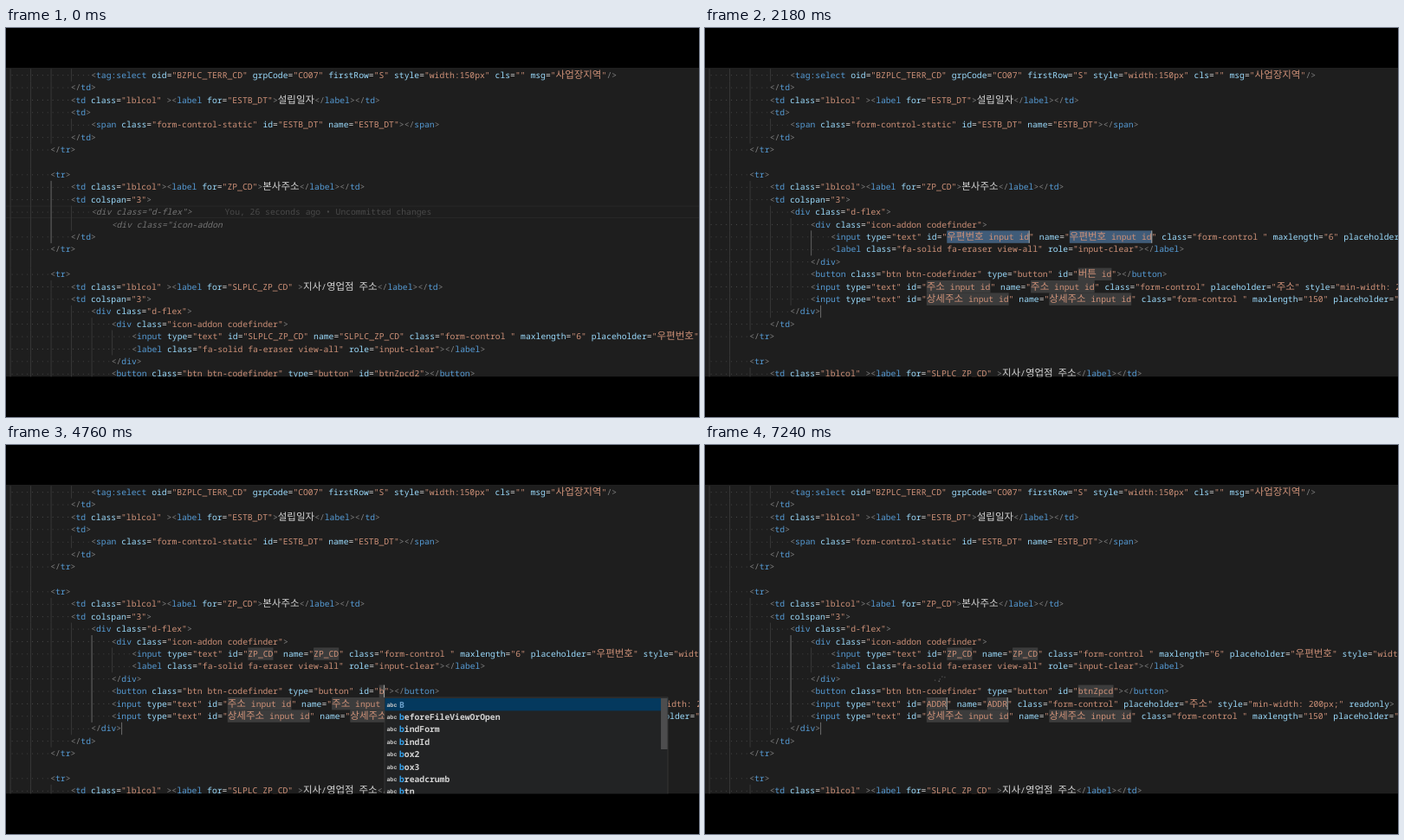
Animation, 800 px wide and 450 px high, one loop 7.27 s. Source, as an HTML page:

```html
<!DOCTYPE html>
<html lang="ko">
<head>
<meta charset="utf-8">
<style>
  html, body { margin: 0; width: 100%; height: 100%; overflow: hidden; background: #000; }
  svg { display: block; width: 800px; height: 450px; }
  text {
    font: 500 9.717px "Noto Sans Mono", "DejaVu Sans Mono", monospace;
    white-space: pre;
    text-rendering: geometricPrecision;
  }
  text.ko { font: 11.5px "Noto Sans CJK KR", "Noto Sans CJK", sans-serif; }
  text.ghost { font-style: italic; }
  text.item { font-weight: 600; }
  text.abc { font: bold 6.6px Inter, Roboto, sans-serif; }
</style>
</head>
<body>
<svg viewBox="0 0 800 450">
  <rect y="46" width="800" height="357.5" fill="#1e1e1e"/>
  <g id="editor"></g>
  <g id="sparks"></g>
  <path d="M0 0H800V46H0ZM0 403.5H800V450H0Z"/>
</svg>
<script>
const LOOP = 7270;
const LEFT = 4.2, TAB = 23.5, CHAR = 5.83, HANGUL = 10.6;
const TOP = 47.2, ROW = 14.4, BASE = 10.6;
const NOTE_SCALE = 0.857;

// Each field: when it gets the focus, what is typed there and when.
const FIELDS = [
  { from: 0, word: 'v-post', keys: [30, 600, 850, 1060, 1260, 1450], minPopup: 2,
    items: ['v-post', 'v-postcode'], details: ['Emmet Abbreviation', '우편번호 input 레이아웃'],
    guide: [3, 11, 11] },
  { from: 1900, word: 'ZP_CD', keys: [2880, 2980, 3090, 3220, 3500], hint: '우편번호 input id',
    items: ['ZP_CD', 'SLPLC_ZP_CD'], row: 13, guide: [5, 13, 14] },
  { from: 3900, word: 'btnZpcd', keys: [4400, 4900, 5080, 5260, 5440, 5600, 5760], hint: '버튼 id',
    items: ['B', 'beforeFileViewOrOpen', 'bindForm', 'bindId', 'box2', 'box3', 'breadcrumb', 'btn', 'btnZpcd2'],
    row: 16, guide: [4, 12, 18] },
  { from: 6000, word: 'ADDR', keys: [6500, 6660, 6820, 6980], hint: '주소 input id',
    items: ['ADDR', 'SLPLC_ADDR'], row: 17, guide: [4, 12, 18] }
];
const GHOST_GUIDE = [2, 9, 13];

// Lines are [indent level, text]; braces mark snippet fields.
const HEAD = [
  [4, '<tag:select oid="BZPLC_TERR_CD" grpCode="CO07" firstRow="S" style="width:150px" cls="" msg="사업장지역"/>'],
  [3, '</td>'],
  [3, '<td class="lblcol" ><label for="ESTB_DT">설립일자</label></td>'],
  [3, '<td>'],
  [4, '<span class="form-control-static" id="ESTB_DT" name="ESTB_DT"></span>'],
  [3, '</td>'],
  [2, '</tr>'],
  [2, ''],
  [2, '<tr>'],
  [3, '<td class="lblcol"><label for="ZP_CD">본사주소</label></td>'],
  [3, '<td colspan="3">']
];
const TAIL = [
  [3, '</td>'],
  [2, '</tr>'],
  [2, ''],
  [2, '<tr>'],
  [3, '<td class="lblcol" ><label for="SLPLC_ZP_CD" >지사/영업점 주소</label></td>'],
  [3, '<td colspan="3">'],
  ...addressBlock('SLPLC_ZP_CD', 'btnZpcd2', 'SLPLC_ADDR', '주소 (법정동명을 입력 안 하는 경우)')
];

function addressBlock(zip, button, addr, hint) {
  return [
    [4, '<div class="d-flex">'],
    [5, '<div class="icon-addon codefinder">'],
    [6, `<input type="text" id="${zip}" name="${zip}" class="form-control " maxlength="6" placeholder="우편번호" style="width: 100px;">`],
    [6, '<label class="fa-solid fa-eraser view-all" role="input-clear"></label>'],
    [5, '</div>'],
    [5, `<button class="btn btn-codefinder" type="button" id="${button}"></button>`],
    [5, `<input type="text" id="${addr}" name="${addr}" class="form-control" placeholder="${hint}" style="min-width: 200px;" readonly>`]
  ];
}

function snippet(values) {
  const [zip, button, addr] = values.map(v => `{${v}}`);
  const detail = '{상세주소 input id}';
  return [
    ...addressBlock(zip, button, addr, '주소'),
    [5, `<input type="text" id="${detail}" name="${detail}" class="form-control " maxlength="150" placeholder="상세주소">`],
    [4, '</div>{}']
  ];
}

const isHangul = c => c >= '가' && c <= '힣';
const width = s => [...s].reduce((w, c) => w + (isHangul(c) ? HANGUL : CHAR), 0);
const rowTop = row => TOP + row * ROW;
const levelX = level => LEFT + level * TAB;
const escape = s => s.replace(/&/g, '&amp;').replace(/</g, '&lt;');
const rect = (x, y, w, h, fill, more = '') =>
  `<rect x="${x}" y="${y}" width="${w}" height="${h}" fill="${fill}" ${more}/>`;

function label(x, y, str, fill, cls = '') {
  let out = '';
  for (const part of str.match(/[가-힣]+|[^가-힣]+/g) || []) {
    const kind = isHangul(part[0]) ? 'ko' : cls;
    out += `<text class="${kind}" x="${x.toFixed(2)}" y="${y.toFixed(2)}" fill="${fill}">${escape(part)}</text>`;
    x += width(part);
  }
  return out;
}

const TOKEN = /(<\/?|\/?>)|((?<=<\/?)[\w:]+)|("[^"]*"?)|([\w-]+(?=[=>]))|[^<>"\w]+|\w+/g;
const COLORS = ['#808080', '#569cd6', '#ce9178', '#9cdcfe'];

function code(x, y, str) {
  let out = '';
  for (const m of str.matchAll(TOKEN)) {
    const group = [1, 2, 3, 4].find(i => m[i] !== undefined);
    out += label(x, y, m[0], group ? COLORS[group - 1] : '#d4d4d4');
    x += width(m[0]);
  }
  return out;
}

const caret = (x, y) => rect(x - 0.4, y, 1, ROW, '#aeafad');
const guide = (level, row, rows, fill) => rect(levelX(level) + 0.4, rowTop(row), 1, rows * ROW + 0.1, fill);

function indent(level, row, dots) {
  let out = '';
  for (let k = 0; k < level; k++) out += guide(k, row, 1, '#383838');
  if (dots) {
    out += `<path d="M${LEFT + 2.9} ${rowTop(row) + 7.4}H${levelX(level) - 1}" stroke="#484848" ` +
      `stroke-width="1.1" stroke-linecap="round" stroke-dasharray="0 ${TAB / 4}"/>`;
  }
  return out;
}

// Draws one line; returns markup and the x of every field end.
function drawLine(row, [level, src], focus, selected) {
  const y = rowTop(row), x0 = levelX(level), ends = [];
  let boxes = '', carets = '', before = '';
  for (const m of src.matchAll(/([^{]*)\{([^}]*)\}/g)) {
    before += m[1];
    const x = x0 + width(before), w = width(m[2]);
    before += m[2];
    boxes += m[2]
      ? rect(x, y, w, ROW, focus && selected ? '#405c79' : '#3c3c3c')
      : rect(x, y, 0.9, ROW, '#747474');
    ends.push(x + w);
    if (focus) carets += caret(x + w, y);
  }
  const text = code(x0, y + BASE, src.replace(/[{}]/g, ''));
  return { svg: indent(level, row, src) + boxes + text + carets, ends };
}

function icon(kind, x, y) {
  if (kind === 'word') return label(x, y + 9.6, 'abc', '#c8c8c8', 'abc');
  if (kind === 'wrench') {
    return `<path d="M${x + 2} ${y + 11}L${x + 6.4} ${y + 6.6}M${x + 8.6} ${y + 2.6}l-2 2l1.6 1.6l2-2a3 3 0 1 1-1.6-1.6" ` +
      'fill="none" stroke="#d4d4d4" stroke-width="1.5" stroke-linecap="round"/>';
  }
  return rect(x + 1.8, y + 2.8, 8.4, 8.8, 'none', 'stroke="#c8c8c8" stroke-width="1.1"');
}

// Smaller text that ends at the given x.
function note(right, y, str, fill, cls) {
  const x = right - width(str) * NOTE_SCALE;
  return `<g transform="translate(${x} ${y}) scale(${NOTE_SCALE})">${label(0, 0, str, fill, cls)}</g>`;
}

function popup(x, y, field, typed) {
  const find = s => s.toLowerCase().indexOf(typed.toLowerCase());
  const list = field.items.filter(s => find(s) >= 0);
  const w = 327;
  let out = rect(x, y, w, list.length * ROW + 2, '#222324', 'stroke="#3c3c3c" stroke-width=".8"');
  list.forEach((item, i) => {
    const top = y + 1 + i * ROW, base = top + BASE, at = find(item);
    if (!i) out += rect(x + 0.5, top, w - 1, ROW, '#04395e');
    const kind = !field.details ? 'word' : i ? 'snippet' : 'wrench';
    out += icon(kind, x + 2.5, top);
    let tx = x + 17;
    [item.slice(0, at), item.slice(at, at + typed.length), item.slice(at + typed.length)].forEach((part, k) => {
      out += label(tx, base, part, k === 1 ? (i ? '#36a3ee' : '#6a9fca') : '#d4d4d4', 'item');
      tx += width(part);
    });
    if (field.details) out += note(x + w - 8, base - 0.4, field.details[i], i ? '#a8a8a8' : '#d4d4d4', i ? '' : 'item');
  });
  if (list.length > 7) out += rect(x + w - 8, y + 1, 7.6, 59, '#4d4d4e');
  return out;
}

function stateAt(t) {
  const focus = FIELDS.findLastIndex(f => t >= f.from);
  const count = FIELDS[focus].keys.filter(k => t >= k).length;
  return { focus, count };
}

function valueOf(i, focus, typed) {
  const f = FIELDS[i];
  return i < focus ? f.word : i === focus && typed ? typed : f.hint;
}

function drawEditor({ focus, count }) {
  const field = FIELDS[focus], typed = field.word.slice(0, count);
  const ghost = !focus && !count;
  let body, out = '', at = levelX(4) + width(typed), row = 11;
  if (focus) {
    body = snippet([1, 2, 3].map(i => valueOf(i, focus, typed)));
    row = field.row;
  } else {
    body = ghost ? [[4, ' '], [4, '']] : [[4, typed]];
  }
  if (ghost) out += rect(0, rowTop(11), 800, 0.9, '#292929') + rect(0, rowTop(12) - 0.9, 800, 0.9, '#292929');
  [...HEAD, ...body, ...TAIL].slice(0, 25).forEach((line, r) => {
    const focused = focus > 0 && r === row;
    const { svg, ends } = drawLine(r, line, focused, !count);
    out += svg;
    if (focused) at = ends[0];
  });
  const [level, first, last] = ghost ? GHOST_GUIDE : field.guide;
  out += guide(level, first, last - first + 1, '#5e5e5e');
  if (ghost) {
    out += label(levelX(4), rowTop(11) + BASE, '<div class="d-flex">', '#747474', 'ghost');
    out += label(levelX(5), rowTop(12) + BASE, '<div class="icon-addon', '#747474', 'ghost');
    out += label(252.5, rowTop(11) + BASE, 'You, 26 seconds ago • Uncommitted changes', '#494949');
  } else if (!focus) {
    out += caret(at, rowTop(11));
  }
  const done = focus && (count === field.word.length && field.word !== 'btnZpcd');
  if (count >= (field.minPopup || 1) && !done) out += popup(at + 0.5, rowTop(row + 1), field, typed);
  return { svg: out, x: at, y: rowTop(row) + ROW / 2 };
}

const random = n => { const v = Math.sin(n * 91.7) * 4373.3; return v - Math.floor(v); };

// Small specks rise from the caret after each key.
function drawSparks(t, { focus, count }, { x, y }) {
  const age = count ? t - FIELDS[focus].keys[count - 1] : LOOP;
  if (age > 330) return '';
  let out = '';
  for (let i = 0; i < 6; i++) {
    const seed = focus * 50 + count * 7 + i + 1;
    const dx = (random(seed) - 0.5) * 14 - age * 0.035;
    const dy = (random(seed + 0.5) - 0.5) * 10 - age * 0.112;
    out += rect(x + dx, y + dy, 1.5, 1.5, '#d0d0d0', `opacity="${(1 - age / 330).toFixed(2)}"`);
  }
  return out;
}

const editor = document.getElementById('editor');
const sparks = document.getElementById('sparks');
const start = performance.now();
let shown = '', scene;

function frame() {
  const t = Math.max(0, performance.now() - start) % LOOP;
  const state = stateAt(t);
  const key = state.focus + ':' + state.count;
  if (key !== shown) {
    shown = key;
    scene = drawEditor(state);
    editor.innerHTML = scene.svg;
  }
  sparks.innerHTML = drawSparks(t, state, scene);
  requestAnimationFrame(frame);
}
frame();
</script>
</body>
</html>
```
